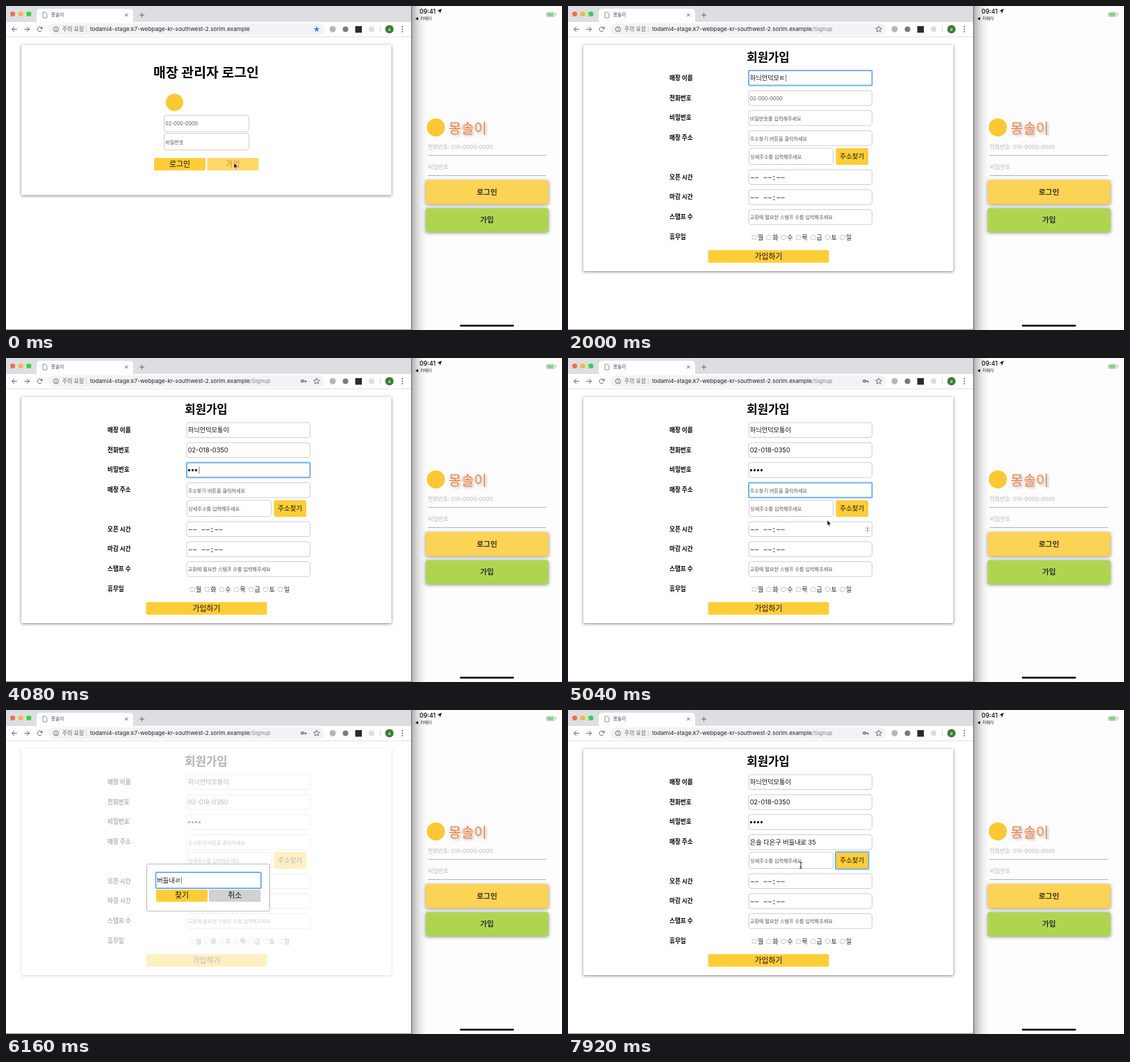
Recreate the animation shown at these times as an HTML page with a canvas. Size 800 px wide and 467 px high, loop 8 s.

```html
<!DOCTYPE html>
<html lang="ko">
<head>
<meta charset="utf-8">
<title>Signup demo</title>
<style>
html, body { margin: 0; width: 100%; height: 100%; overflow: hidden; background: #fff; }
canvas { display: block; width: 800px; height: 467px; }
</style>
</head>
<body>
<canvas id="stage" width="800" height="467"></canvas>
<script>
const ctx = document.getElementById('stage').getContext('2d');
const SANS = 'Inter, "Noto Sans CJK KR", "Noto Sans CJK", "Noto Sans CJK JP", sans-serif';
const MONO = '"Liberation Mono", "DejaVu Sans Mono", monospace';
const LOOP = 8000, STEP = 80;
const YELLOW = '#ffcd37', HOVER = '#ffd866', ORANGE = '#f07a3c', INK = '#111';

const BRAND = '몽솔이';
const HOST = 'todami4-stage.k7-webpage-kr-southwest-2.sorim.example';
const SHOP = '하늬언덕모퉁이';
const PHONE = '02-018-0350';
const QUERY = '버들내로 35';
const ADDRESS = '은솔 다온구 ' + QUERY;

// Moments of the hard changes, in ms
const AT = { signup: 240, name: 640, phone: 2480, pass: 3520, key: 3760,
  addr: 4400, find: 5280, result: 6800, close: 7520 };

// Pointer paths as [time, x, y]; the pointer hides between them
const PATHS = [
  [[0, 328, 226], [160, 328, 226], [640, 300, 104], [800, 300, 104]],
  [[4640, 310, 108], [5040, 373, 233.5], [5200, 402, 218], [5520, 402, 218]],
  [[6560, 300, 232], [6720, 253, 268], [6880, 253, 268], [7200, 280, 266],
   [7440, 296, 241], [7520, 296, 241], [7920, 335, 224], [8000, 335, 224]]
];

// Keystrokes of a text, with Hangul composed letter by letter
const LEADS = 'ㄱㄲㄴㄷㄸㄹㅁㅂㅃㅅㅆㅇㅈㅉㅊㅋㅌㅍㅎ';
function strokes(text) {
  const out = [''];
  let done = '';
  for (const ch of text) {
    const code = ch.charCodeAt(0) - 0xac00;
    if (code >= 0 && code < 11172) {
      out.push(done + LEADS[Math.floor(code / 588)]);
      if (code % 28) out.push(done + String.fromCharCode(0xac00 + code - code % 28));
    }
    done += ch;
    out.push(done);
  }
  return out;
}
const KEYS = { shop: strokes(SHOP), phone: strokes(PHONE), pass: strokes('••••'), query: strokes(QUERY) };
function typed(keys, t, start, pace) {
  const n = Math.floor((t - start) / pace) + 1;
  return keys[Math.max(0, Math.min(keys.length - 1, n))];
}

function pointerAt(t) {
  for (const p of PATHS) {
    for (let i = 1; i < p.length; i++) {
      const [t0, x0, y0] = p[i - 1], [t1, x1, y1] = p[i];
      if (t < t0 || t >= t1) continue;
      const u = (t - t0) / (t1 - t0), k = u * u * (3 - 2 * u);
      return { x: x0 + (x1 - x0) * k, y: y0 + (y1 - y0) * k };
    }
  }
  return null;
}

let hit = null, beam = false;
const over = (x, y, w, h) => hit && hit.x >= x && hit.x <= x + w && hit.y >= y && hit.y <= y + h;

function text(s, x, cy, size, color = INK, { weight = 400, align = 'left', font = SANS } = {}) {
  ctx.font = `${weight} ${size}px ${font}`;
  ctx.textAlign = align;
  ctx.fillStyle = color;
  ctx.fillText(s, x, cy + size * 0.36);
  return ctx.measureText(s).width;
}
function rect(x, y, w, h, color) {
  ctx.fillStyle = color;
  ctx.fillRect(x, y, w, h);
}
function box(x, y, w, h, r, fill, { stroke, line = 1, shadow } = {}) {
  ctx.save();
  ctx.beginPath();
  ctx.roundRect(x, y, w, h, r);
  if (shadow) [ctx.shadowColor, ctx.shadowBlur, ctx.shadowOffsetY] = shadow;
  if (fill) { ctx.fillStyle = fill; ctx.fill(); }
  ctx.shadowColor = 'transparent';
  if (stroke) { ctx.strokeStyle = stroke; ctx.lineWidth = line; ctx.stroke(); }
  ctx.restore();
}
function disc(x, y, r, color) {
  ctx.beginPath();
  ctx.arc(x, y, r, 0, 7);
  ctx.fillStyle = color;
  ctx.fill();
}
function lines(color, width, ...paths) {
  ctx.strokeStyle = color;
  ctx.lineWidth = width;
  for (const p of paths) {
    ctx.beginPath();
    for (let i = 0; i < p.length; i += 2) ctx.lineTo(p[i], p[i + 1]);
    ctx.stroke();
  }
}
function shape(pts, fill, stroke, width = 1) {
  ctx.beginPath();
  for (let i = 0; i < pts.length; i += 2) ctx.lineTo(pts[i], pts[i + 1]);
  ctx.closePath();
  if (fill) { ctx.fillStyle = fill; ctx.fill(); }
  if (stroke) { ctx.strokeStyle = stroke; ctx.lineWidth = width; ctx.stroke(); }
}
function ring(x, y, w, h) {
  box(x, y, w, h, 1.5, null, { stroke: '#74b1f2', line: 2 });
}

function button(x, y, w, h, label, { size = 10.9, fill = YELLOW } = {}) {
  const hot = fill === YELLOW && over(x, y, w, h);
  box(x, y, w, h, 2, hot ? HOVER : fill);
  text(label, x + w / 2, y + h / 2 - 0.3, size, hot ? ORANGE : INK, { align: 'center' });
}
function field(x, y, w, h, value, hint, focused) {
  if (over(x, y, w, h)) beam = true;
  box(x + 0.5, y + 0.5, w - 1, h - 1, focused ? 2 : 3.5, '#fff', { stroke: '#c9c9c9', line: 0.9 });
  if (focused) ring(x + 0.5, y + 0.5, w - 1, h - 1);
  const cy = y + h / 2;
  let tw = 0;
  if (/^•/.test(value)) {
    [...value].forEach((_, i) => disc(x + 4 + i * 5, cy + 0.3, 1.7, INK));
    tw = value.length * 5;
  } else if (value) tw = text(value, x + 2.3, cy, 9.2);
  else text(hint, x + 2.3, cy + 0.6, 7.1, '#555');
  if (focused && value) rect(x + 3 + tw, cy - 5, 0.8, 10, '#555');
}

function star(x, y, on) {
  const pts = [];
  for (let i = 0; i < 10; i++) {
    const a = -Math.PI / 2 + i * Math.PI / 5, r = i % 2 ? 2 : 4.6;
    pts.push(x + r * Math.cos(a), y + r * Math.sin(a));
  }
  shape(pts, on && '#4285f4', on ? null : '#5f6368', 0.9);
}

function chrome(t) {
  const grey = '#5f6368';
  rect(0, 0, 583, 24, '#dcdee2');
  ['#f9694f', '#f7b93b', '#3fcb4c'].forEach((c, i) => disc(9.7 + i * 11.6, 11.5, 3.6, c));
  box(44, 4, 139, 24, 5, '#fff');
  rect(0, 23, 583, 22, '#fff');
  shape([53, 9, 57, 9, 59, 11, 59, 17, 53, 17], '#fff', '#777', 0.8);
  text(BRAND, 65, 13, 6.6, '#444');
  lines('#555', 0.9, [171.2, 10.9, 175.4, 15.1], [175.4, 10.9, 171.2, 15.1], [192, 13, 199, 13], [195.5, 9.5, 195.5, 16.5]);

  lines(grey, 1, [15.7, 33.5, 8.5, 33.5], [12, 30, 8.5, 33.5, 12, 37]);
  lines(grey, 1, [26.5, 33.5, 33.7, 33.5], [30.2, 30, 33.7, 33.5, 30.2, 37]);
  ctx.beginPath();
  ctx.arc(48.5, 33.5, 3.4, 0.5, 5.6);
  ctx.stroke();
  shape([52.5, 29.6, 52.5, 33, 49.1, 33], grey);

  box(61, 25, 397, 17, 8.5, '#f1f3f4');
  ctx.beginPath();
  ctx.arc(72, 33.5, 3.6, 0, 7);
  ctx.strokeStyle = grey;
  ctx.lineWidth = 0.9;
  ctx.stroke();
  rect(71.5, 33, 1, 2.6, grey);
  rect(71.5, 31.2, 1, 1, grey);
  text('주의 요함', 81, 33.5, 7.9, grey);
  rect(115, 29, 0.8, 9, '#ccc');
  const w = text(HOST, 121, 33.5, 8.2, '#222');
  if (t >= AT.signup) text('/Signup', 121 + w, 33.5, 8.2, '#80868b');
  if (t >= AT.key) {
    ctx.beginPath();
    ctx.arc(426.3, 33.3, 1.6, 0, 7);
    ctx.strokeStyle = grey;
    ctx.lineWidth = 1.3;
    ctx.stroke();
    lines(grey, 1.3, [428, 33.3, 432.5, 33.3], [431.3, 33.3, 431.3, 35.5]);
  }
  star(447, 33.5, t < AT.signup);
  disc(470, 33.5, 4.5, '#b5b8bc');
  disc(488.5, 33.5, 4, '#777a7e');
  rect(502.5, 29, 9.5, 9.5, '#2b2b2b');
  disc(526, 33.5, 4, '#dcdcde');
  rect(538, 29, 0.8, 9, '#ccc');
  disc(551.7, 33.5, 6, '#3c7d2e');
  text('a', 551.7, 33, 7, '#fff', { align: 'center' });
  [30, 33.5, 37].forEach(y => disc(570.3, y, 0.95, grey));
  rect(0, 44, 583, 0.8, '#dadce0');
}

function card(h) {
  box(22, 56, 532.5, h, 1, '#fff', { shadow: ['rgba(0,0,0,.5)', 4, 1] });
}

function login() {
  card(216.5);
  text('매장 관리자 로그인', 288, 96, 19.4, '#000', { weight: 700, align: 'center' });
  disc(242.5, 139, 12.5, '#fcc935');
  field(227, 157, 123, 24.5, '', '02-000-0000');
  field(227, 183, 123, 25, '', '비밀번호');
  button(213, 219, 74, 18, '로그인');
  button(289.5, 219, 74, 18, '가입');
}

function timeField(y) {
  field(259.5, y, 178.5, 22.5, '', '');
  text('−− −−:−−', 262, y + 11.5, 10.4, '#222', { font: MONO });
  // The hover area reaches a little above the border
  if (!over(260, y - 3, 178, 25)) return;
  box(428.5, y + 7, 5, 9, 2, '#fff', { stroke: '#ccc', line: 0.7 });
  shape([429.7, y + 10.5, 431, y + 8.5, 432.3, y + 10.5], '#555');
  shape([429.7, y + 12.5, 431, y + 14.5, 432.3, y + 12.5], '#555');
}

function signup(t) {
  card(326);
  text('회원가입', 288, 74, 16.7, '#000', { weight: 700, align: 'center' });
  const labels = ['매장 이름', '전화번호', '비밀번호', '매장 주소', '오픈 시간', '마감 시간', '스탬프 수', '휴무일'];
  labels.forEach((s, i) => text(s, 146, 104 + i * 28.7 + (i > 3 ? 27.8 : 0), 8.6, '#000', { weight: 700 }));

  const focus = ['addr', 'pass', 'phone', 'name'].find(k => t >= AT[k]);
  const closed = t >= AT.close;
  const row = (y, value, hint, on) => field(259.5, y, 178.5, 22.5, value, hint, on);
  row(92.5, typed(KEYS.shop, t, 800, 100), '매장 이름을 입력해주세요', focus === 'name');
  row(121.5, typed(KEYS.phone, t, 2560, 80), '02-000-0000', focus === 'phone');
  row(150.2, typed(KEYS.pass, t, 3760, 120), '비밀번호를 입력해주세요', focus === 'pass');
  row(179.2, closed ? ADDRESS : '', '주소찾기 버튼을 클릭하세요', focus === 'addr' && t < AT.find);
  field(260, 204.5, 122, 24.5, '', '상세주소를 입력해주세요.');
  button(385.5, 205, 46.5, 24, '주소찾기', { size: 9.5 });
  if (closed) ring(385, 204.5, 47.5, 25);
  timeField(235.5);
  timeField(264.3);
  row(293, '', '교환에 필요한 스탬프 수를 입력해주세요');
  [...'월화수목금토일'].forEach((day, i) => {
    const x = 265 + i * 21.15;
    box(x, 330.5, 6, 6, 1, '#fff', { stroke: '#bbb', line: 0.8 });
    text(day, x + 8, 333.3, 9, '#222');
  });
  button(201.5, 352, 174, 18, '가입하기');
}

function dialog(x, y, w, h) {
  box(x, y, w, h, 2.5, '#fff', { stroke: '#b8b8b8', line: 1 });
}
function findDialog(t) {
  dialog(202.5, 222, 177, 68);
  field(215, 233.5, 152.5, 24, typed(KEYS.query, t, 5600, 80), '주소를 입력해주세요', true);
  button(216, 259, 74, 17.5, '찾기');
  button(292, 259, 74.5, 17.5, '취소', { fill: '#d1d1d1' });
}
function resultDialog() {
  dialog(191.5, 220, 199.5, 72);
  box(204, 232, 174, 18, 1.5, '#e8e8e8');
  text(ADDRESS, 290.5, 240.8, 10.9, INK, { align: 'center' });
  button(254, 261, 74, 18, '닫기');
}

function phone() {
  rect(584, 0, 216, 467, '#fdfdfd');
  const g = ctx.createLinearGradient(584, 0, 608, 0);
  [0.3, 0.17, 0.08, 0.025, 0].forEach((a, i) => g.addColorStop(i / 4, `rgba(0,0,0,${a})`));
  rect(584, 0, 24, 467, g);
  rect(583, 0, 1, 467, '#6a6a6a');
  rect(0, 466, 584, 1, '#8a8a8a');

  text('09:41', 595, 8, 8.8, '#000', { weight: 500 });
  shape([627, 4, 624.2, 11, 623.7, 7.6, 620.4, 7], '#000');
  shape([589, 18.3, 593, 16, 593, 20.6], '#000');
  text('카메라', 596, 18.3, 6, '#222');
  box(777.5, 9, 12.5, 6.5, 2, '#d9efd9', { stroke: '#b4c2b4', line: 0.7 });
  box(778.5, 10, 9, 4.5, 1, '#86cd8d');
  rect(791, 11, 1, 2.5, '#b4c2b4');

  disc(618.5, 175, 13, '#fcc935');
  ctx.save();
  [ctx.shadowColor, ctx.shadowBlur, ctx.shadowOffsetX, ctx.shadowOffsetY] = ['rgba(0,0,0,.25)', 3, 2, 2];
  text(BRAND, 636.5, 177, 20, '#f58345');
  ctx.restore();

  text('전화번호: 010-0000-0000', 607, 203.3, 7.9, '#b8b8b8');
  text('비밀번호', 607, 232.5, 8, '#b8b8b8');
  rect(607, 214.8, 170, 0.9, '#aaa');
  rect(607, 244, 170, 0.9, '#aaa');
  [['로그인', 251, '#fcd354'], ['가입', 291.5, '#afd54f']].forEach(([label, y, color]) => {
    box(604, y, 176.5, 34.5, 2.5, color, { shadow: ['rgba(0,0,0,.45)', 5, 1] });
    text(label, 692, y + 17, 10.7, '#333', { weight: 700, align: 'center' });
  });
  box(653, 459.5, 78, 2.6, 1.3, '#000');
}

function cursor({ x, y }) {
  if (beam) {
    lines('#222', 0.9, [x, y - 4, x, y + 4], [x - 2, y - 4.5, x, y - 3.7, x + 2, y - 4.5],
      [x - 2, y + 4.5, x, y + 3.7, x + 2, y + 4.5], [x - 1, y + 1.5, x + 1, y + 1.5]);
    return;
  }
  const pts = [0, 0, 0, 8, 1.8, 6.4, 3, 9.2, 4.3, 8.6, 3.1, 5.9, 5.6, 5.8];
  shape(pts.map((v, i) => v + (i % 2 ? y : x)), '#000', '#fff', 0.7);
}

function draw(t) {
  const pointer = pointerAt(t);
  const open = t >= AT.find && t < AT.close;
  beam = false;
  hit = open ? null : pointer;
  rect(0, 0, 800, 467, '#fff');
  if (t < AT.signup) login();
  else signup(t);
  if (open) {
    rect(0, 45, 583, 422, 'rgba(255,255,255,.7)');
    hit = pointer;
    if (t < AT.result) findDialog(t);
    else resultDialog();
  }
  chrome(t);
  phone();
  if (pointer) cursor(pointer);
}

const start = performance.now();
function tick() {
  const t = (performance.now() - start) % LOOP;
  draw(Math.floor(t / STEP) * STEP);
  requestAnimationFrame(tick);
}
tick();
</script>
</body>
</html>
```
